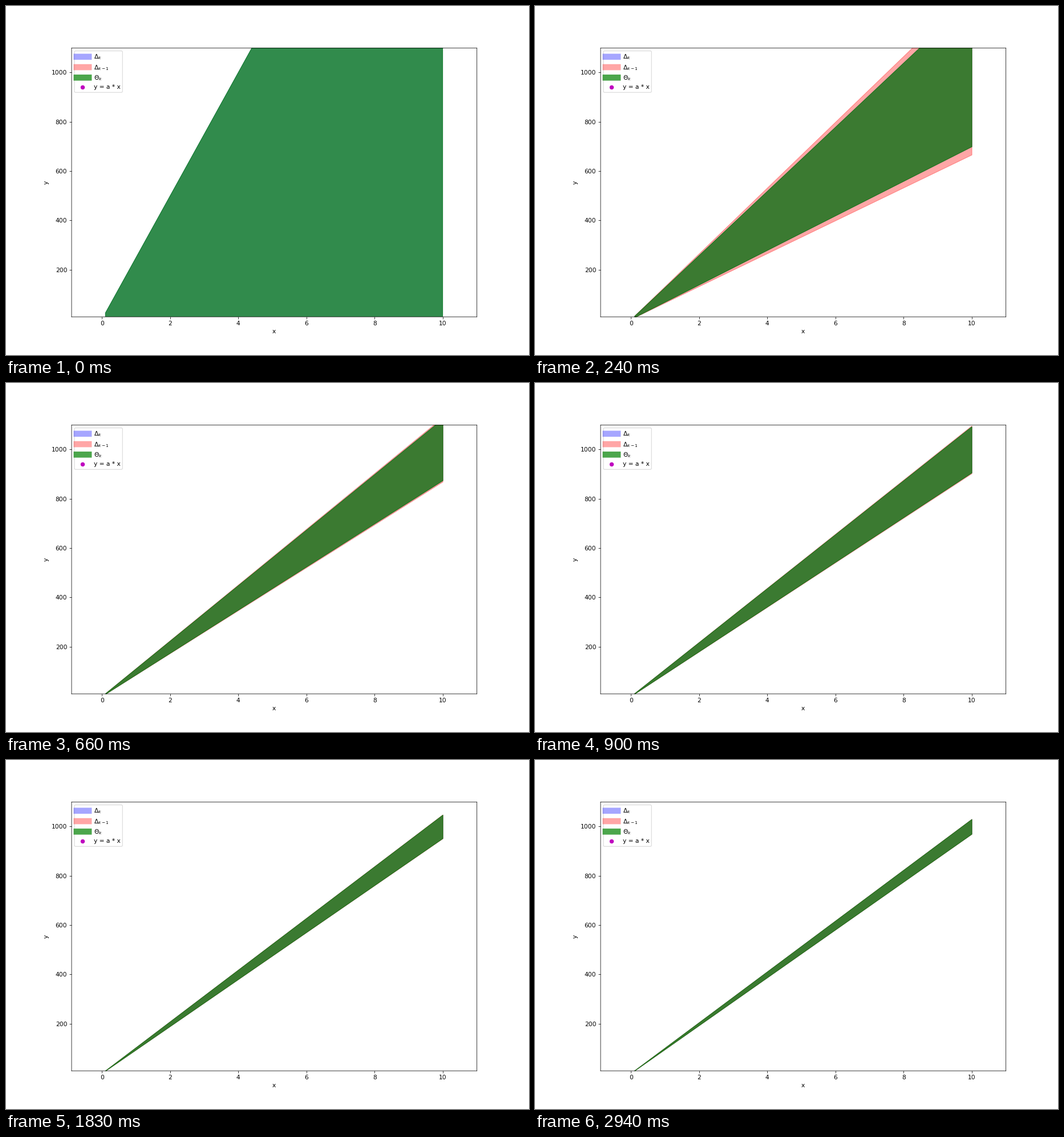
Animation, 917 px wide and 611 px high, one loop 2970 ms. Source, as a matplotlib script:

```python
import matplotlib.pyplot as plt
from matplotlib.animation import FuncAnimation
from matplotlib.collections import PolyCollection
from matplotlib.lines import Line2D
from matplotlib.transforms import ScaledTranslation

DPI = 76.4
WIDTH, HEIGHT = 917, 611
FRAMES, INTERVAL = 99, 30

SLOPE = 100        # true parameter a
ERROR = 300        # slope uncertainty at k = 1
X0, X1 = 0.1, 10

# Smooth sub-pixel lines instead of pixel-snapped ones
plt.rcParams.update({
    "font.family": "DejaVu Sans",
    "path.snap": False,
    "axes.linewidth": 0.72,
    "xtick.major.width": 0.72,
    "ytick.major.width": 0.72,
})

fig, ax = plt.subplots(
    figsize=((WIDTH + 1e-3) / DPI, (HEIGHT + 1e-3) / DPI), dpi=DPI)
ax.set(xlim=(X0 - 1, X1 + 1), ylim=(10, 1100), xlabel="x", ylabel="y")

# The frame sits a hair to the lower right of the data area
nudge = ScaledTranslation(0.005, -0.005, fig.dpi_scale_trans)
for spine in ax.spines.values():
    spine.set_transform(spine.get_spine_transform() + nudge)

STYLES = [
    (r"$\Delta_k$", "b", 0.35),
    (r"$\Delta_{k-1}$", "r", 0.35),
    (r"$\Theta_k$", "g", 0.7),
]


def wedge(k):
    """Corners of the region between the two bounding lines at step k."""
    low, high = SLOPE - ERROR / k, SLOPE + ERROR / k
    return [(X0, low * X0), (X1, low * X1), (X1, high * X1), (X0, high * X0)]


def add_region(color, alpha):
    region = PolyCollection([], facecolors=color, edgecolors=color,
                            alpha=alpha, linewidths=1)
    return ax.add_collection(region, autolim=False)


current, previous, common = [add_region(c, a) for _, c, a in STYLES]

handles = [Line2D([0], [0], color=c, lw=10, alpha=a, label=name)
           for name, c, a in STYLES]
handles.append(Line2D([0], [0], color="m", marker="o", ls="none",
                      label="y = a * x"))
ax.legend(handles=handles, loc="upper left", labelspacing=0.42, borderpad=0.37)


def update(i):
    k = i + 2
    current.set_verts([wedge(k)])
    previous.set_verts([wedge(k - 1)] if i else [])
    common.set_verts([wedge(k)])  # nested wedges: the overlap is the newer one
    return current, previous, common


anim = FuncAnimation(fig, update, frames=FRAMES, interval=INTERVAL,
                     init_func=lambda: update(0), repeat=True, repeat_delay=0)
plt.show()
```
